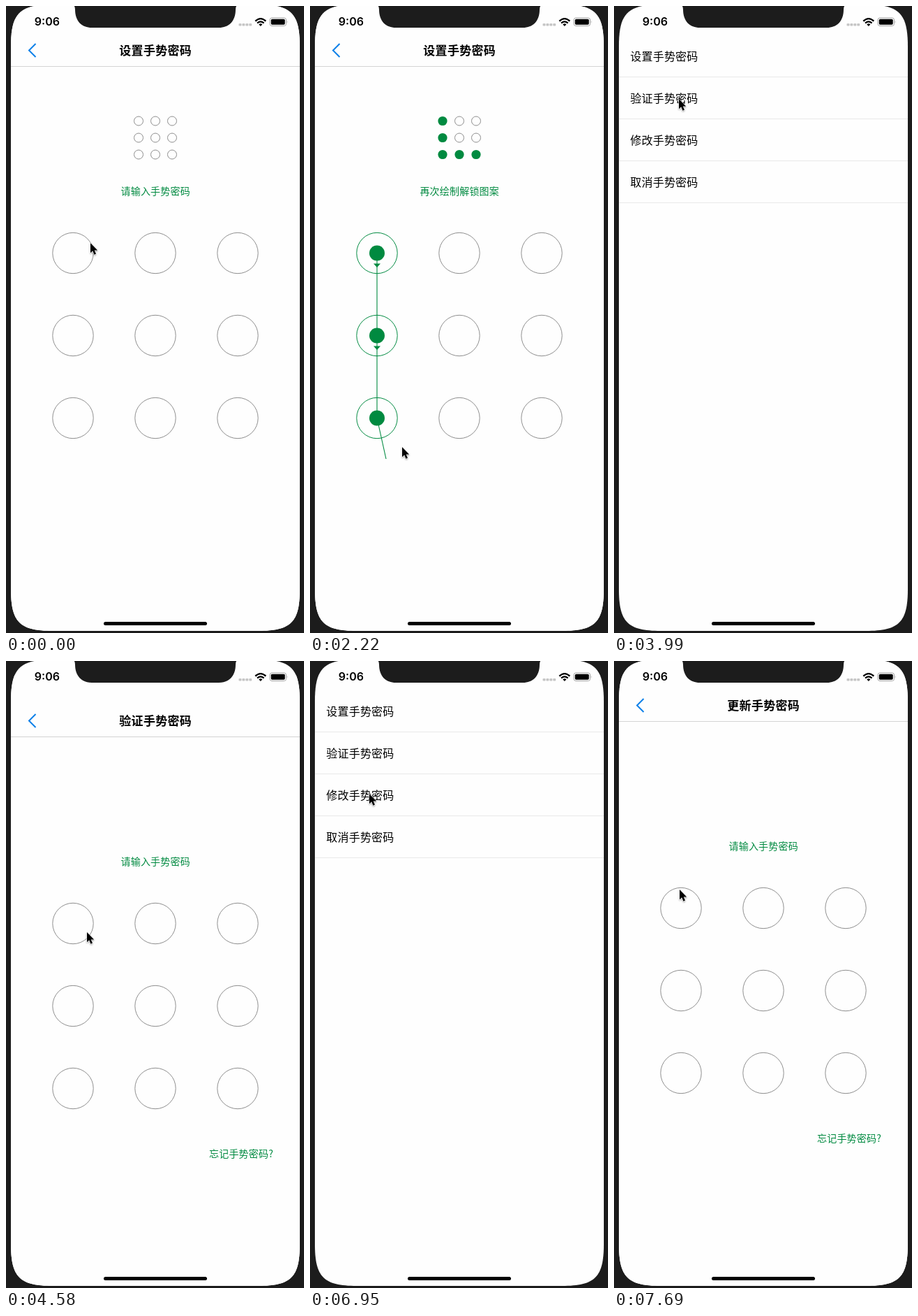
An HTML page that plays this animation: 427 by 897 pixels, repeating every 7.99 s.

```html
<!DOCTYPE html>
<html lang="zh-CN">
<head>
<meta charset="utf-8">
<title>手势密码</title>
<style>
  html, body { margin: 0; width: 100%; height: 100%; overflow: hidden; background: #1c1c1c; }
  svg { display: block; width: 427px; height: 897px; }
  text { font-family: "Noto Sans CJK SC", "Noto Sans CJK", sans-serif; }
  .clock { font: 600 16px Inter, sans-serif; }
  .title { font-size: 17px; font-weight: 600; letter-spacing: .3px; text-anchor: middle; }
  .note { font-size: 14px; letter-spacing: .2px; fill: #008a40; }
  .hint { text-anchor: middle; }
  .row { font-size: 16px; letter-spacing: .2px; }
  .ring { fill: none; stroke: #8e8e8e; }
  .on { stroke: #008a40; }
  .dot { fill: #008a40; }
  .line { fill: none; stroke: #008a40; stroke-width: 1.1; }
</style>
</head>
<body>
<svg viewBox="0 0 427 897">
  <defs>
    <clipPath id="screen">
      <path d="M7 58C7 10.4 19.4 -2 67 -2H361C408.600 -2 421 10.400 421 58V834C421 881.600 408.600 894 361 894H67C19.400 894 7 881.600 7 834Z"/>
    </clipPath>
    <filter id="shade" x="-60%" y="-40%" width="220%" height="200%">
      <feDropShadow dx="0" dy="1.200" stdDeviation="1" flood-opacity=".4"/>
    </filter>
  </defs>
  <rect width="427" height="897" fill="#1c1c1c"/>
  <g clip-path="url(#screen)">
    <rect width="427" height="897" fill="#fefefe"/>
    <g id="list"></g>
    <g id="sheet">
      <rect y="-2" width="427" height="900" fill="#fefefe"/>
      <path d="M42.500 54L33 63.500L42.500 73" fill="none" stroke="#0a7fe8" stroke-width="2"/>
      <rect y="86" width="427" height="1" fill="#d4d4d4"/>
      <text id="title" class="title" x="214.200" y="70.300"></text>
      <g id="thumb"></g>
      <text id="hint" class="note hint" x="214.200" y="270"></text>
      <g id="pad"></g>
      <text id="forgot" class="note" x="291" y="688.300">忘记手势密码?</text>
    </g>
    <path d="M95 -2Q99 -1 99 5C99 22 109 31 123 31H305C319 31 329 22 329 5Q329 -1 333 -2Z" fill="#1c1c1c"/>
    <text class="clock" x="40.800" y="28.300">9:06</text>
    <g fill="#c6c6c6">
      <rect x="333.500" y="25" width="4" height="3.500" rx="1"/>
      <rect x="338.400" y="25" width="4" height="3.500" rx="1"/>
      <rect x="343.300" y="25" width="4" height="3.500" rx="1"/>
      <rect x="348.200" y="25" width="4" height="3.500" rx="1"/>
    </g>
    <g fill="none" stroke="#000" stroke-width="2.300">
      <path d="M357.300 21.700Q364.800 14.600 372.300 21.700"/>
      <path d="M360 24.500Q364.800 20.200 369.600 24.500"/>
    </g>
    <path d="M362.200 26.300Q364.800 24.200 367.400 26.300L364.800 28.900Z"/>
    <rect x="378" y="17" width="23.500" height="11.500" rx="3" fill="none" stroke="#a4a4a4"/>
    <rect x="379.700" y="18.700" width="20" height="8" rx="1.700"/>
    <path d="M402.800 20.800Q404.500 22.700 402.800 24.600Z" fill="#a4a4a4"/>
    <rect x="140" y="881" width="148" height="5" rx="2.500"/>
  </g>
  <path id="mouse" d="M0 0V14.300L3.200 11.300L5.500 16.700L8 15.600L5.700 10.400H10.200Z"
        stroke="#fff" stroke-width="1" paint-order="stroke" filter="url(#shade)"/>
</svg>
<script>
const LOOP = 7990, HEIGHT = 897, RATE = 0.0162;
const $ = id => document.getElementById(id);

// Screen refreshes: first time, last time, count
const RUNS = [
  [0, 0, 1], [150, 1190, 8], [1330, 2360, 8], [2510, 3540, 8], [3690, 3990, 3],
  [4280, 5180, 7], [5330, 5910, 5], [6210, 7250, 8], [7400, 7690, 3]
];
const TICKS = RUNS.flatMap(([a, b, n]) => Array.from({ length: n }, (_, i) =>
  Math.floor((a + (n > 1 ? (b - a) * i / (n - 1) : 0)) / 10) * 10));

// Pointer path: time, x, y
const PATH = [
  [0, 121, 339], [150, 106, 350], [290, 98, 420], [440, 99, 500], [590, 106, 586],
  [740, 220, 589], [890, 338, 590], [1040, 334, 587], [1190, 250, 480],
  [1330, 150, 375], [1470, 103, 348], [1770, 99, 480], [1910, 101, 570],
  [2060, 107, 664], [2130, 109, 648], [2210, 132, 631], [2360, 259, 593],
  [2510, 345, 590], [2800, 352, 589], [2950, 335, 562], [3240, 165, 255],
  [3390, 105, 125], [3540, 86, 85], [3840, 91, 122], [3990, 93, 133],
  [4280, 93, 134], [4580, 116, 388], [4730, 110, 366], [4880, 99, 353],
  [5180, 99, 452], [5470, 106, 590], [5760, 335, 590], [5830, 369, 588],
  [5910, 368, 588], [6350, 366, 586], [6800, 120, 235], [6950, 85, 190],
  [7250, 86, 193], [7690, 94, 327]
];

// The same five nodes each time, with the moment each lights up
const ORDER = [0, 3, 6, 7, 8];
const STROKES = [
  { hits: [150, 440, 590, 740, 890], end: 1040 },
  { hits: [1470, 1770, 2060, 2360, 2510], end: 2800 },
  { hits: [4880, 5180, 5470, 5620, 5760], end: 6210 }
];

const SHEETS = [
  { title: "设置手势密码", from: -2000, to: 2887 },
  { title: "验证手势密码", from: 4236, to: 6289 },
  { title: "更新手势密码", from: 7216, to: 99999 }
];

const node = i => [96 + 118 * (i % 3), 353.5 + 118 * Math.floor(i / 3)];
const ring = (x, y, r, on) => `<circle class="ring${on ? " on" : ""}" cx="${x}" cy="${y}" r="${r}"/>`;
const dot = (x, y, r) => `<circle class="dot" cx="${x}" cy="${y}" r="${r}"/>`;
const spring = t => t <= 0 ? 1 : (1 + RATE * t) * Math.exp(-RATE * t);

function pointer(t) {
  const i = PATH.findIndex(p => p[0] > t);
  if (i < 0) return PATH[PATH.length - 1].slice(1);
  const [a, x, y] = PATH[i - 1], [b, u, v] = PATH[i];
  const k = (t - a) / (b - a);
  return [x + (u - x) * k, y + (v - y) * k];
}

function arrow(from, to) {
  const [x, y] = node(from);
  const turn = to - from === 1 ? 0 : 90;
  return `<path class="dot" d="M15 -5V5L20.500 0Z" transform="translate(${x} ${y}) rotate(${turn})"/>`;
}

function pad(t) {
  const stroke = STROKES.find(s => t >= s.hits[0] && t < s.end);
  const lit = stroke ? ORDER.filter((_, i) => t >= stroke.hits[i]) : [];
  let out = "";
  for (let i = 0; i < 9; i++) out += ring(...node(i), 29.2, lit.includes(i));
  if (!lit.length) return out;
  const points = [...lit.map(node), pointer(t - 80)];
  out += `<polyline class="line" points="${points.join(" ")}"/>`;
  lit.forEach((n, i) => {
    out += dot(...node(n), 11);
    if (i + 1 < lit.length) out += arrow(n, lit[i + 1]);
  });
  return out;
}

function thumb(filled) {
  let out = "";
  for (let i = 0; i < 9; i++) {
    const x = 190 + 24 * (i % 3), y = 164.5 + 24 * Math.floor(i / 3);
    out += filled && ORDER.includes(i) ? dot(x, y, 6.6) : ring(x, y, 6.5);
  }
  return out;
}

function sheetOffset(s, t) {
  const y = HEIGHT * (t < s.to ? spring(t - s.from) : 1 - spring(t - s.to));
  return y < 4 ? 0 : Math.round(y);
}

function draw(t) {
  const sheet = SHEETS.filter(s => t >= s.from).pop();
  const first = sheet === SHEETS[0], again = first && t >= 1040;
  $("sheet").setAttribute("transform", `translate(0 ${sheetOffset(sheet, t)})`);
  $("title").textContent = sheet.title;
  $("hint").textContent = again ? "再次绘制解锁图案" : "请输入手势密码";
  $("thumb").innerHTML = first ? thumb(again) : "";
  $("forgot").style.display = first ? "none" : "";
  $("pad").innerHTML = pad(t);
  $("mouse").setAttribute("transform", `translate(${pointer(t).map(Math.round).join(" ")})`);
}

$("list").innerHTML = ["设置", "验证", "修改", "取消"].map((word, i) =>
  `<text class="row" x="23.300" y="${78 + 60 * i}">${word}手势密码</text>` +
  `<rect y="${101 + 60 * i}" width="427" height="1" fill="#e9e9e9"/>`).join("");

let shown = -1;
function frame() {
  const now = performance.now() % LOOP;
  const tick = TICKS.filter(t => t <= now).pop();
  if (tick !== shown) draw(shown = tick);
  requestAnimationFrame(frame);
}
frame();
</script>
</body>
</html>
```
